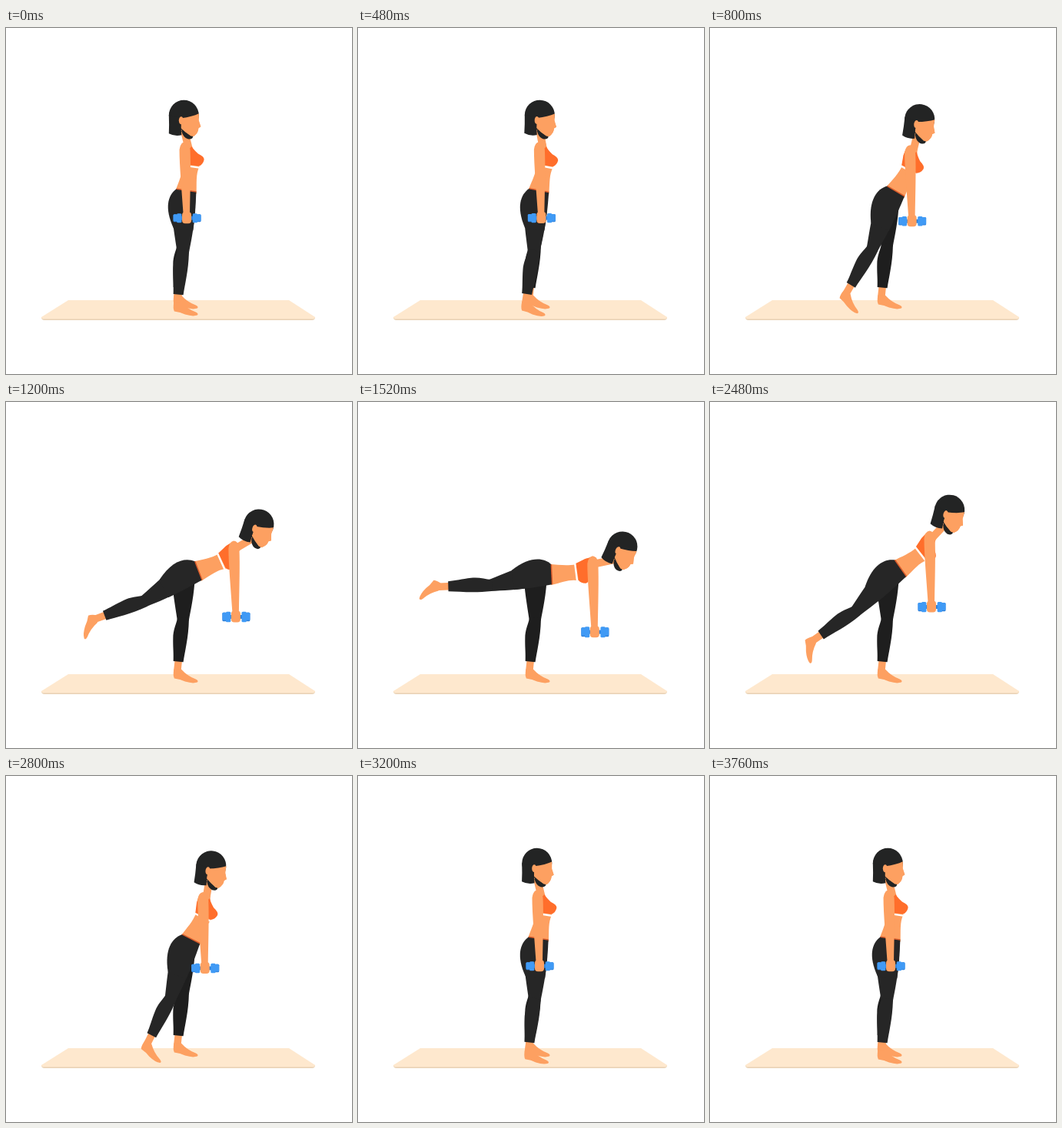
These frames come from a looping animation (450 px wide and 450 px high, 3840 ms). An HTML page with a canvas:

```html
<!DOCTYPE html>
<html lang="en">
<head>
<meta charset="utf-8">
<title>Single-leg deadlift</title>
<style>
html, body { margin: 0; width: 100%; height: 100%; overflow: hidden; background: #fff; }
canvas { display: block; width: 450px; height: 450px; }
</style>
</head>
<body>
<canvas id="stage" width="450" height="450"></canvas>
<script>
const ctx = document.getElementById('stage').getContext('2d');
const LOOP = 3840, STEP = 80;
const SKIN = '#fda061', BRA = '#ff6e2b', HAIR = '#232424';
const PANTS = '#262626', PANTS_FAR = '#1e1e1e', WAISTBAND = '#d95c2c';
const BLUE = '#409af5', BLUE_SHADE = '#2f7fd6';
const THIGH = 64, SHIN = 54, ANKLE = 12, ARM = 86;

const FAR_LEG = { hip: [232, 220], thigh: 2, shin: 6, foot: 0 };

// Smooth step along half a cosine wave.
function ease(time, start, end) {
  const u = Math.min(1, Math.max(0, (time - start) / (end - start)));
  return (1 - Math.cos(Math.PI * u)) / 2;
}

// Place a point of a turned local frame on the stage.
function place([ox, oy], degrees, x, y) {
  const r = degrees * Math.PI / 180, c = Math.cos(r), s = Math.sin(r);
  return [ox + x * c - y * s, oy + x * s + y * c];
}

function inFrame([x, y], degrees, draw) {
  ctx.save();
  ctx.translate(x, y);
  ctx.rotate(degrees * Math.PI / 180);
  draw();
  ctx.restore();
}

function fillPath(color, d) {
  ctx.fillStyle = color;
  ctx.fill(new Path2D(d));
}

function fillBox(color, x, y, w, h, r) {
  ctx.fillStyle = color;
  ctx.beginPath();
  ctx.roundRect(x, y, w, h, r);
  ctx.fill();
}

function fillEllipse(color, x, y, rx, ry) {
  ctx.fillStyle = color;
  ctx.beginPath();
  ctx.ellipse(x, y, rx, ry, 0, 0, Math.PI * 2);
  ctx.fill();
}

function line(color, width, a, b, cap = 'butt') {
  ctx.strokeStyle = color;
  ctx.lineWidth = width;
  ctx.lineCap = cap;
  ctx.beginPath();
  ctx.moveTo(...a);
  ctx.lineTo(...b);
  ctx.stroke();
}

// The hip hinge: every joint follows from one lean value, 0 upright to 1 level.
function poseAt(time) {
  const lean = ease(time, 290, 1595) - ease(time, 1880, 3320);
  const swing = (from, range, power) => from + range * lean ** power;
  const hip = [232 + 2 * lean, 229 - 4 * lean];
  const pelvis = swing(8, 80, 1.15);
  const torso = swing(-2, 75, 1.15);
  const waist = place(hip, pelvis, 0, -18);
  const shoulder = place(waist, torso, 0, -56);
  return {
    pelvis, torso, waist, shoulder,
    wrist: [shoulder[0] + 2, shoulder[1] + ARM],
    weightSize: 6 + lean,
    head: place(waist, torso, -4, -91),
    headTurn: 24 * lean,
    leg: { hip, thigh: swing(2, 77, 1.3), shin: swing(6, 83, 1.12), foot: swing(0, 120, 1.2) }
  };
}

function drawMat() {
  fillPath('#e8d2b6', 'M46 376 H402 Q402 380 398 380 H50 Q46 380 46 376 Z');
  fillPath('#fee8ce', 'M81 354 H368 L402 376 Q402 378.5 399 378.5 H49 Q46 378.5 46 376 Z');
}

function drawLeg(color, { hip, thigh, shin, foot }) {
  const knee = place(hip, thigh, 0, THIGH);
  const cuff = place(knee, shin, 0, SHIN);
  const ankle = place(cuff, shin, 0, ANKLE);
  line(SKIN, 9.5, cuff, ankle, 'round');
  inFrame(ankle, foot, () => fillPath(SKIN,
    'M-4.5 -2 Q-6 6 -4 10 Q4 11 10 14 Q20 17 26 15 Q28 13 24 11 Q13 7 5 -2 Z'));
  inFrame(hip, thigh, () => fillPath(color,
    'M-16 5 C-15 25 -11 42 -7 64 L8 64 C10 50 14 30 14 5 Z'));
  inFrame(knee, shin, () => fillPath(color,
    'M-7 -2 C-8 6 -11 14 -10 24 C-9 36 -7 44 -6.5 54 L6.5 54 C7 40 10 22 8 -2 Q0 -6 -7 -2 Z'));
}

// Joins the waistband to the raised thigh.
function drawPelvis({ waist, pelvis, leg: { hip, thigh } }) {
  const back = place(waist, pelvis, -13, 0), front = place(waist, pelvis, 13, 0);
  ctx.fillStyle = PANTS;
  ctx.beginPath();
  ctx.moveTo(...back);
  ctx.bezierCurveTo(...place(hip, pelvis, -23, -8), ...place(hip, thigh, -26, 6),
    ...place(hip, thigh, -13, 32));
  ctx.lineTo(...place(hip, thigh, 12.5, 34));
  ctx.quadraticCurveTo(...place(hip, thigh, 15, 12), ...front);
  ctx.fill();
  line(WAISTBAND, 1.5, back, front);
}

function drawTorso({ waist, torso }) {
  inFrame(waist, torso, () => {
    fillPath(SKIN, 'M-14 0 C-9 -13 -4 -22 -3 -34 L-6 -48 Q-6 -60 -2 -62 '
      + 'L8 -62 L18 -30 C13 -21 14 -10 13 5 Z');
    fillPath(BRA, 'M-4 -34 L-6 -47 Q-6 -60 -3 -61.5 L7 -60 Q10 -54 17 -47 '
      + 'Q25 -43 24.5 -39 Q23 -33 18 -31 Z');
    line('#fff', 2.4, [-4, -33], [18, -29]);
  });
}

function drawHead({ waist, torso, head, headTurn }) {
  line(SKIN, 10, place(waist, torso, 4, -59), place(head, headTurn, 4, 11), 'round');
  inFrame(head, headTurn, () => {
    fillPath(HAIR, 'M2 10 L16 20 Q16 25 9 24 Q3 22 1 14 Z');
    fillPath(SKIN, 'M-2 -8 L22 -12 L23 0 L26 8 L23 10 Q23 16 17 20.5 L13 20 L6 15 L0 9 Z');
    fillEllipse(HAIR, 4, -7, 19.5, 19.5);
    // Face below the fringe.
    fillPath(SKIN, 'M23.5 -9 Q15 -5 1 -3 L0 10 L6 15 L13 20 L17 20.5 Q23 16 23 10 L26 8 L23.5 0 Z');
    fillPath(HAIR, 'M-15.5 -7 Q-15 6 -15.5 17 Q-8 21 1 19 L0 5 L2 -4 Z');
    fillEllipse(SKIN, 0.5, 0, 3, 5);
  });
}

function drawWeight({ wrist: [x, y], weightSize: r }) {
  inFrame([x + 1, y + 6], 0, () => {
    line(BLUE_SHADE, 5, [-12, 0], [12, 0]);
    for (const side of [-1, 1]) {
      fillBox(BLUE_SHADE, side * 15.3 - 2.7, 1 - r, 5.4, 2 * r - 2, 1.5);
      fillBox(BLUE, side * 15.3 - 2.7, 1 - r, 5.4, 1.5 * r, 1.5);
      fillBox(BLUE, side * 10.3 - 3.2, -r, 6.4, 2 * r, 1.5);
    }
  });
}

function drawArm({ shoulder, wrist: [x, y] }) {
  inFrame(shoulder, 0, () => fillPath(SKIN,
    `M0 -7 Q-6 -6 -7 3 C-7 24 -4 55 -2 ${ARM} L6.5 ${ARM} C7 55 8 24 7 3 Q6 -6 0 -7 Z`));
  fillBox(SKIN, x - 5.5, y - 2, 12, 15, 4);
}

function render(time) {
  const pose = poseAt(time);
  ctx.fillStyle = '#fff';
  ctx.fillRect(0, 0, 450, 450);
  drawMat();
  drawLeg(PANTS_FAR, FAR_LEG);
  drawTorso(pose);
  drawLeg(PANTS, pose.leg);
  drawPelvis(pose);
  drawHead(pose);
  drawWeight(pose);
  drawArm(pose);
}

function tick() {
  render(Math.floor(performance.now() % LOOP / STEP) * STEP);
  requestAnimationFrame(tick);
}
tick();
</script>
</body>
</html>
```
